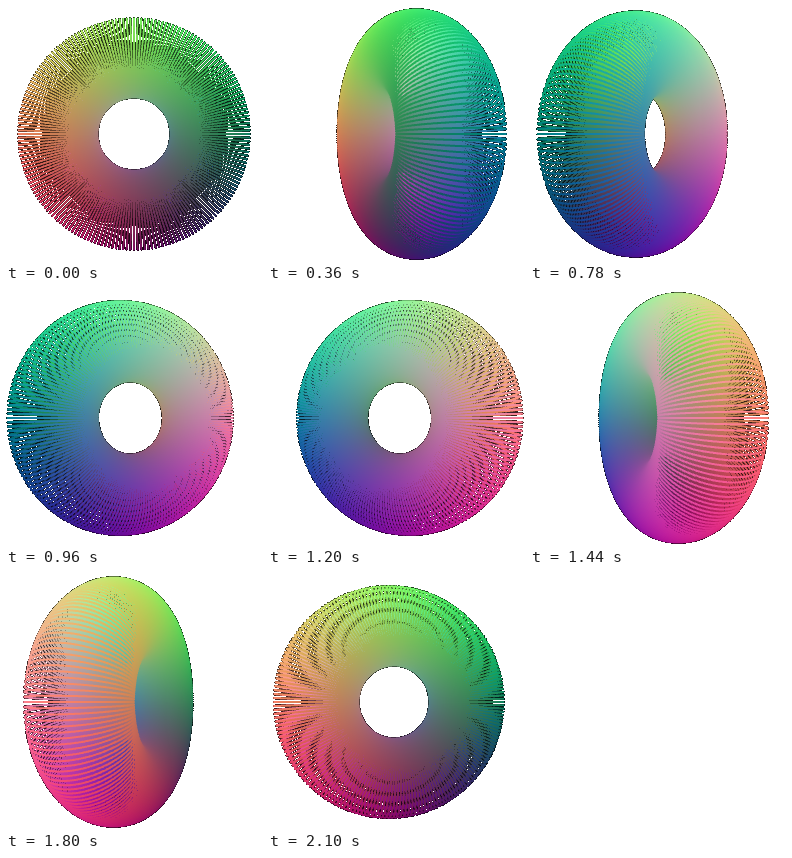
Recreate the animation shown at these times as an HTML page with a canvas. Size 256 by 256 pixels, loop 2160 ms.

```html
<!DOCTYPE html>
<html>
<head>
<meta charset="utf-8">
<title>Rotating torus</title>
<style>
html, body { margin: 0; width: 100%; height: 100%; overflow: hidden; background: #fff; }
canvas { display: block; width: 256px; height: 256px; }
</style>
</head>
<body>
<canvas id="stage" width="256" height="256"></canvas>
<script>
const SIZE = 256, SUB = 4, PAD = 4;
const WIDE = (SIZE + 2 * PAD) * SUB, MID = WIDE / 2;
const RING = 1, TUBE = 0.5, CAMERA = 3;
const FOCAL = SIZE * SUB / 2 / Math.tan(Math.PI / 6); // 60 degree field of view
const LOOPS = 200, POINTS = 600;
const STEP_MS = 60, STEPS = 36;

const ctx = document.getElementById('stage').getContext('2d');
const depth = new Float32Array(WIDE * WIDE);
const color = new Uint32Array(WIDE * WIDE);

const circle = n => Array.from({ length: n }, (_, i) => {
  const a = i / n * 2 * Math.PI;
  return [Math.cos(a), Math.sin(a)];
});
const around = circle(LOOPS), across = circle(POINTS);
const channel = v => Math.round(255 * Math.min(1, Math.max(0, 0.5 + v / 3)));

// Round pen, two pixels wide, as offsets into the sample grid
const pen = [];
for (let y = -SUB; y < SUB; y++) {
  for (let x = -SUB; x < SUB; x++) {
    if (Math.hypot(x + 0.5, y + 0.5) <= SUB) pen.push(y * WIDE + x);
  }
}
// Four samples per pixel on a rotated grid
const samples = [[1, 0], [3, 1], [0, 2], [2, 3]].map(([x, y]) => y * WIDE + x);

function dot(x, y, z, rgb) {
  const at = Math.round(y) * WIDE + Math.round(x);
  for (let n = 0; n < pen.length; n++) {
    const i = at + pen[n];
    if (z > depth[i]) {
      depth[i] = z;
      color[i] = rgb;
    }
  }
}

// One thin circle around the tube, coloured by its position in space
function drawLoop([ca, sa], cos, sin) {
  for (const [cb, sb] of across) {
    const rho = RING + TUBE * cb;
    const x = rho * ca, y = rho * sa, z = TUBE * sb;
    const near = x * sin + z * cos;
    const scale = FOCAL / (CAMERA - near);
    const rgb = 0xff000000 | channel(-z) << 16 | channel(y) << 8 | channel(-x);
    dot(MID + (x * cos - z * sin) * scale, MID - y * scale, near, rgb);
  }
}

// Average the samples over black; untouched pixels stay white
function resolve() {
  const image = ctx.createImageData(SIZE, SIZE), out = image.data;
  for (let y = 0, o = 0; y < SIZE; y++) {
    for (let x = 0; x < SIZE; x++, o += 4) {
      const at = ((y + PAD) * WIDE + x + PAD) * SUB;
      let r = 0, g = 0, b = 0, hits = 0;
      for (const s of samples) {
        const c = color[at + s];
        if (!c) continue;
        hits++;
        r += c & 255;
        g += c >> 8 & 255;
        b += c >> 16 & 255;
      }
      out[o] = hits ? r / 4 : 255;
      out[o + 1] = hits ? g / 4 : 255;
      out[o + 2] = hits ? b / 4 : 255;
      out[o + 3] = 255;
    }
  }
  return image;
}

function render(step) {
  const turn = step / STEPS * 2 * Math.PI;
  depth.fill(-9);
  color.fill(0);
  for (const a of around) drawLoop(a, Math.cos(turn), Math.sin(turn));
  return resolve();
}

const views = [];
let shown = -1;
function tick() {
  const step = Math.floor(performance.now() / STEP_MS) % STEPS;
  if (step !== shown) {
    views[step] ||= render(step);
    ctx.putImageData(views[step], 0, 0);
    shown = step;
  }
  requestAnimationFrame(tick);
}
tick();
</script>
</body>
</html>
```
